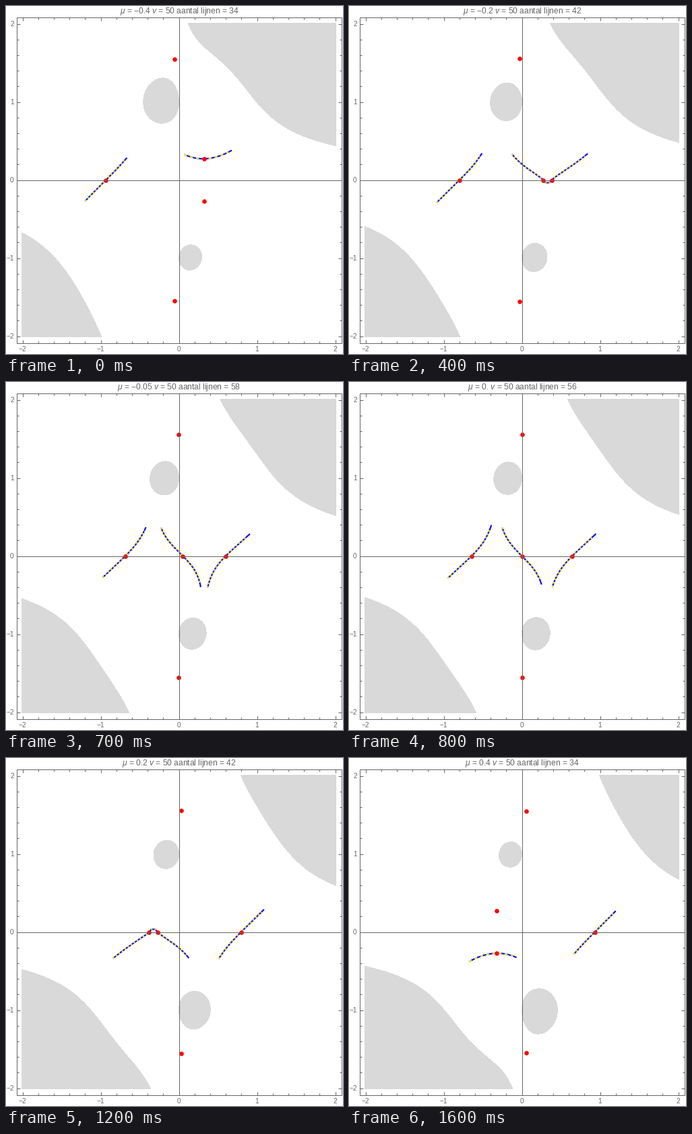
Write a matplotlib script that moves like this. It is 500 px wide and 517 px high and loops after 1700 ms.

```python
import numpy as np
import matplotlib.pyplot as plt
from matplotlib.animation import FuncAnimation
from matplotlib.patches import Rectangle

W, H, DPI = 500, 517, 64
PT = 72 / DPI                      # points per pixel
CX, CY, UNIT = 256.5, 258.5, 116   # origin and scale of the complex plane
LEFT, RIGHT, TOP, BOTTOM = 15.5, 497.5, 16.5, 500.5
INK, SHADE = "0.4", "#d9d9d9"
FRAMES, INTERVAL = 17, 100
NU = 50
MERGE, FOLD = 0.18, 0.2066         # range of |mu| where two paths join; fold point
LINES = [56, 58, 62, 64, 42, 38, 36, 34, 34]   # per 0.05 of |mu|

# Height of Im f at which each path end stops, as knots over |mu|
STOPS = {
    "a_left": ([0, .1, .2, .4], [.119, .104, .125, .1085]),
    "a_right": ([0, .1, .2, .4], [.13, .1185, .1376, .114]),
    "b_left": ([0, .1, .2, .4], [.11, .1365, .125, .0966]),
    "b_right": ([0, .1, .15, .2], [.11, .123, .123, .0002]),
    "c_left": ([0, .1, .15, .2], [.13, .111, .111, .0002]),
    "c_right": ([0, .1, .2, .4], [.119, .112, .152, .15]),
}

plt.rcParams.update({
    "font.family": "Liberation Sans",
    "mathtext.fontset": "custom",
    "mathtext.rm": "Liberation Sans",
    "mathtext.it": "Liberation Sans:italic",
})


def phase(z, mu):
    return (z - mu) ** 2 / 2 + 1 / (1 + z * z)


def slope(z, mu):
    return z - mu - 2 * z / (1 + z * z) ** 2


def curvature(z):
    return 1 - 2 * (1 - 3 * z * z) / (1 + z * z) ** 3


def saddles(mu):
    return np.roots([1, -mu, 2, -2 * mu, -1, -mu])


def px(z):
    z = np.asarray(z)
    return CX + UNIT * z.real, CY - UNIT * z.imag


def descend(z0, mu, side, stop, step=0.004):
    """Follow the steepest descent path from a saddle to a height of Im f."""
    def heading(z):
        d = 1j / slope(z, mu)
        return d / abs(d)

    w = np.sqrt(1j / curvature(z0))
    z = z0 + side * step * w / abs(w)
    points = [z0, z]
    while phase(z, mu).imag < stop and len(points) < 400:
        z = z + step * heading(z + step / 2 * heading(z))
        points.append(z)
    return points


def path(z0, mu, left, right):
    def stop(key):
        return np.interp(-mu, *STOPS[key])

    back = descend(z0, mu, -1, stop(left))
    ahead = descend(z0, mu, 1, stop(right))
    return np.array(back[:0:-1] + ahead)


def paths(mu):
    """Left-to-right curves with a flag for coarse dashes."""
    m = -abs(mu)
    roots = saddles(m)
    real = sorted(float(r.real) for r in roots if abs(r.imag) < 1e-6)
    curves = [(path(real[0], m, "a_left", "a_right"), False)]
    if -m > FOLD:
        upper = next(r for r in roots if 1e-6 < r.imag < 1)
        curves.append((path(upper, m, "b_left", "c_right"), True))
    else:
        b = path(real[1], m, "b_left", "b_right")
        c = path(real[2], m, "c_left", "c_right")
        if -m > MERGE:
            curves.append((np.concatenate([b, c]), False))
        else:
            curves += [(b, False), (c, False)]
    if mu > 0:
        curves = [(-z[::-1], coarse) for z, coarse in curves]
    return curves


def heading_text(mu):
    sign = "\u2212" if mu < 0 else ""
    value = f"{abs(mu):g}" if mu else "0."
    count = LINES[round(abs(mu) / 0.05)]
    return (rf"$\mathit{{\mu}}$ = {sign}{value} $\mathit{{v}}$ = {NU} "
            f"aantal lijnen = {count}")


fig = plt.figure(figsize=(W / DPI, H / DPI), dpi=DPI, facecolor="white")
ax = fig.add_axes([0, 0, 1, 1])
ax.set_autoscale_on(False)


def fix_view():
    ax.set_xlim(0, W)
    ax.set_ylim(H, 0)
    ax.axis("off")


def rule(x, y):
    ax.plot(x, y, color=INK, lw=PT, solid_capstyle="butt", zorder=6)


def label(x, y, text, align):
    ax.text(x, y, text, size=10 * PT, color=INK, ha=align, va="baseline")


def draw_frame():
    ax.add_patch(Rectangle((LEFT, TOP), RIGHT - LEFT, BOTTOM - TOP,
                           fill=False, ec=INK, lw=PT, zorder=6))
    rule([LEFT, RIGHT], [CY, CY])
    rule([CX, CX], [TOP, BOTTOM])
    for i in range(-10, 11):
        size = 3 if i % 5 else 5
        x, y = CX + UNIT * i / 5, CY - UNIT * i / 5
        rule([x, x], [TOP, TOP + size])
        rule([x, x], [BOTTOM, BOTTOM - size])
        rule([LEFT, LEFT + size], [y, y])
        rule([RIGHT, RIGHT - size], [y, y])
        if i % 5 == 0:
            text = str(i // 5).replace("-", "\u2212")
            label(x, 513, text, "center")
            label(11.7, y + 3.6, text, "right")


fix_view()
draw_frame()
title = ax.text(CX + 0.5, 11, "", size=12 * PT, color=INK,
                ha="center", va="baseline")
dots, = ax.plot([], [], "o", color="red", ms=6.6 * PT, mew=0, zorder=5)

side = np.linspace(-2.008, 2.008, 400)
GRID = side[None, :] + 1j * side[:, None]
GX, GY = px(GRID)
live = []


def update(i):
    while live:
        live.pop().remove()
    mu = round(-0.4 + 0.05 * i, 2)
    title.set_text(heading_text(mu))
    dots.set_data(*px(saddles(mu)))
    live.append(ax.contourf(GX, GY, phase(GRID, mu).imag, levels=[0.99, 1e9],
                            colors=[SHADE], zorder=1))
    for z, coarse in paths(mu):
        x, y = px(z)
        live.extend(ax.plot(x, y, color="blue", lw=2.1 * PT, zorder=3,
                            solid_capstyle="butt"))
        dash = (2, 2.4) if coarse else (1.1, 1.5)
        live.extend(ax.plot(x[:-12], y[:-12], color="yellow", lw=2.1 * PT,
                            ls=(0, dash), dash_capstyle="butt", zorder=4))
    fix_view()
    return [title, dots]


anim = FuncAnimation(fig, update, frames=FRAMES, interval=INTERVAL,
                     init_func=lambda: update(0), repeat=True, repeat_delay=0)
plt.show()
```
